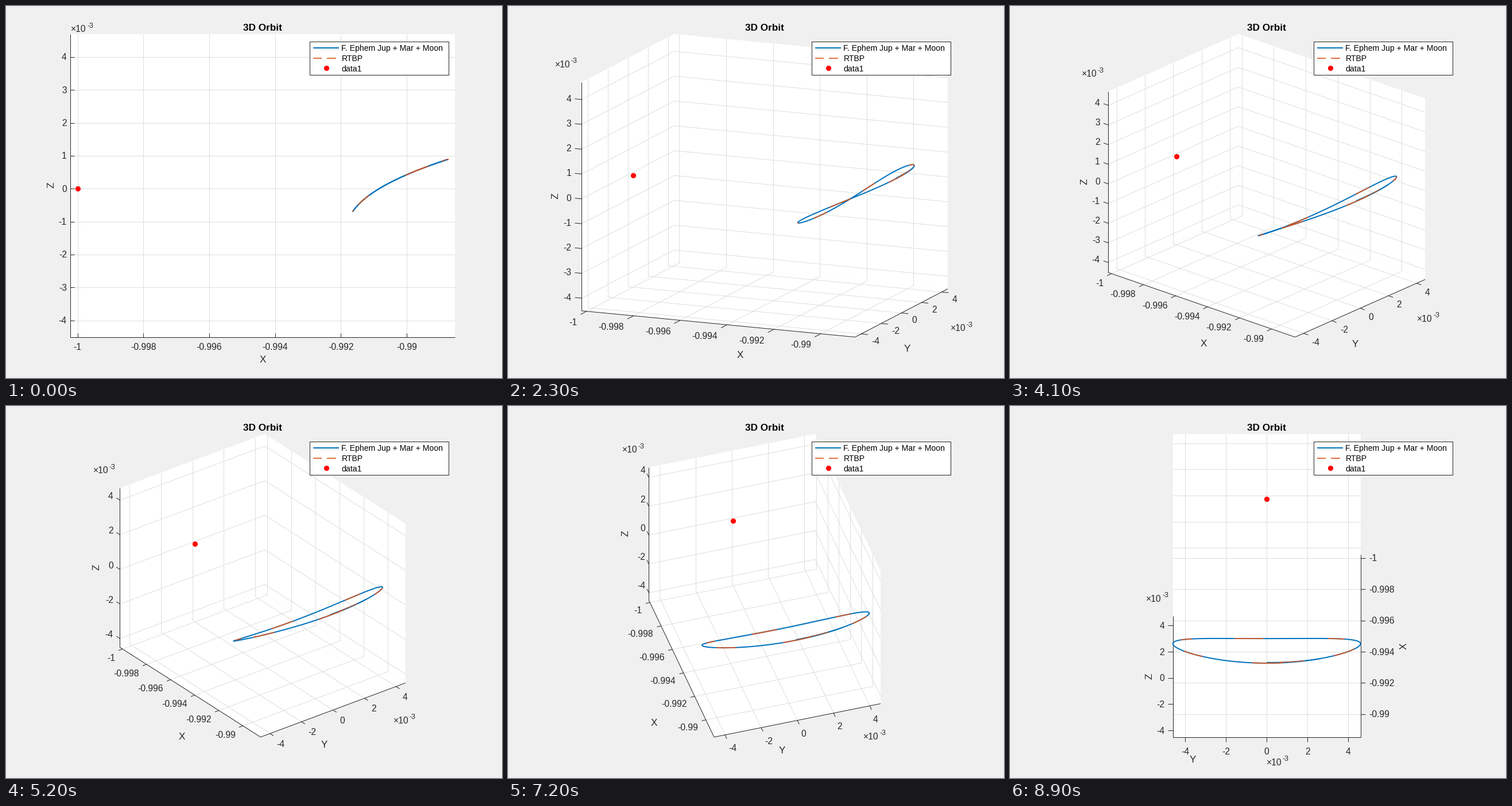
Recreate the animation shown at these times as a matplotlib script. Size 864x648 px, loop 9 s.

```python
import matplotlib.pyplot as plt
import numpy as np
from matplotlib.animation import FuncAnimation
from matplotlib.collections import LineCollection
from matplotlib.patches import Polygon, Rectangle

plt.rcParams["font.family"] = "Liberation Sans"

W, H, FRAMES = 864, 648, 90
PT = 0.72                                   # points per pixel at 100 dpi
LEFT, TOP, BOX_W, BOX_H = 112.32, 48.6, 669.6, 528.12
MID = np.array([LEFT + BOX_W / 2, TOP + BOX_H / 2])

# Data in units of 1e-3; x is measured from -1.
CENTER = np.array([5.625, 0.0, 0.0966])
HALF = np.array([5.838, 4.602, 4.6045])
(X0, Y0, Z0), (X1, Y1, Z1) = CENTER - HALF, CENTER + HALF

INK, GRID = (0.15, 0.15, 0.15), (0.87, 0.87, 0.87)
BLUE, ORANGE = "#0072BD", "#D95319"
TICK, LABEL, LEGEND = 15.6, 17.1, 14.0
GAP = 6.5
DOWN = np.array([0.0, 1.0])

# Offsets of the axis names and the y exponent along the turn
KEYS = [1, 12, 23, 41, 63, 72, 88]
X_NAME = ([72, 59, 38, 4, -33, -48, -90], [45, 47, 53, 66, 86, 94, 104])
Y_NAME = ([44, 27, 10, -9, -22.5, -26.5, -34], [44, 56.5, 61, 61.5, 56.5, 51.5, 42])
Y_EXP = ([62, 45, 26, 7, -7, -9, -12], [42, 62, 67, 67, 61, 56, 40])

ORANGE_ARCS = [(-9, 10), (46, 69), (124, 139), (182, 200), (233, 246), (298, 317)]

fig = plt.figure(figsize=(W / 100, H / 100), dpi=100, facecolor="#F0F0F0")
ax = fig.add_axes([0, 0, 1, 1])


class View:
    """Orthographic camera fitted to the plot box."""

    def __init__(self, az, el):
        ca, sa, ce, se = np.cos(az), np.sin(az), np.cos(el), np.sin(el)
        right = np.array([ca, sa, 0])
        down = np.array([sa * se, -ca * se, -ce])
        self.axes = np.stack([right, down], axis=1)
        w, h = 2 * HALF @ np.abs(self.axes)
        self.scale = min(BOX_W / w, BOX_H / h)
        self.top = MID[1] - h * self.scale / 2
        self.lengths = 2 * HALF * np.linalg.norm(self.axes, axis=1) * self.scale

    def __call__(self, *p):
        p = np.stack(np.broadcast_arrays(*p), axis=-1)
        return MID + self.scale * (p - CENTER) @ self.axes

    def toward(self, axis, sign):
        d = sign * self.axes[axis]
        return d / np.linalg.norm(d)


def orbit(deg, shrink=0):
    t = np.radians(deg)
    u = 9.59 + 1.4515 * np.cos(t) + 0.222 * np.cos(2 * t) - shrink
    z = 0.109 + 0.7935 * np.cos(t) - 0.009 * np.cos(2 * t)
    return u, 4.6 * np.sin(t), z


def write(x, y, s, size, ha="center", color=INK, **kw):
    """Put text with its capitals centred on height y."""
    ax.text(x, y + 0.355 * size, s, fontsize=size * PT, ha=ha, va="baseline",
            color=color, **kw)


def write_up(x, y, s, size):
    ax.text(x + 0.355 * size, y, s, fontsize=size * PT, rotation=90, color=INK,
            rotation_mode="anchor", ha="center", va="baseline")


def exponent(x, y):
    write(x - 21, y + 0.7, "\u00d710", TICK, "left")
    write(x + 7, y - 5.5, "-3", 12.5, "left")


def stroke(p, color, width):
    ax.plot(p[:, 0], p[:, 1], color=color, lw=width * PT, solid_capstyle="butt")


def segments(segs, color, width=1.0):
    ax.add_collection(LineCollection(segs, colors=[color], linewidths=width * PT))


def ruler(ends, points, labels, d, size, ha, valign, nudge=0):
    """Axis line with ticks along d; a negative size draws them inward."""
    segs = [ends] + [np.array([p, p + size * d]) for p in points]
    segments(segs, INK)
    for p, s in zip(points, labels):
        q = p + (max(size, 0) + GAP) * d
        write(q[0] + nudge, q[1] + (10.3 if valign == "top" else 0), s, TICK, ha)


def offset(table, k):
    return np.array([np.interp(k, KEYS, row) for row in table])


def panes(v, last, ticks):
    xs, ys, zs = ticks
    faces = [v([X0, X1, X1, X0], [Y0, Y0, Y1, Y1], Z0),
             v([X0, X1, X1, X0], Y1, [Z0, Z0, Z1, Z1]),
             v(X0, [Y0, Y1, Y1, Y0], [Z0, Z0, Z1, Z1])]
    for f in faces:
        ax.add_patch(Polygon(f, fc="white", ec="none"))
    segs = [v(x, [Y0, Y1], Z0) for x in xs]
    segs += [v([X0, X1], y, Z0) for y in ys]
    segs += [v(X0, y, [Z0, Z1]) for y in ys]
    segs += [v(X0, [Y0, Y1], z) for z in zs]
    if not last:
        segs += [v(x, Y1, [Z0, Z1]) for x in xs]
        segs += [v([X0, X1], Y1, z) for z in zs]
    segments(segs, GRID)


def rulers(v, k, el, ticks):
    xs, ys, zs = ticks
    first, last = k == 0, k == FRAMES - 1
    size = -0.01 * BOX_W if first else 0.025 * v.lengths.max()
    x_text = [f"{-1 + x / 1000:g}" for x in xs]
    y_text, z_text = ([f"{t:g}" for t in ts] for ts in (ys, zs))

    zx = X1 if last else X0
    z_dir = v.toward(1, -1) if last else v.toward(0, -1)
    z_line = v(zx, Y0, [Z0, Z1])
    ruler(z_line, v(zx, Y0, zs), z_text, z_dir, size, "right", "middle")
    z_mid, z_top = z_line.mean(0), z_line[1]
    write_up(z_mid[0] - 34.5 - max(size, 0), z_mid[1] - 0.5, "Z", LABEL)
    exponent(*(z_top + ((22, -9.5) if first else (-25.5, -32))))

    flat = el < np.radians(9.5)
    xy = Y1 if last else Y0
    x_line, x_pts = v([X0, X1], xy, Z0), v(xs, xy, Z0)
    x_mid = x_line.mean(0)
    if last:
        ruler(x_line, x_pts, x_text, v.toward(1, 1), size, "left", "middle")
        write_up(x_mid[0] + 74, x_mid[1], "X", LABEL)
    else:
        d = DOWN if flat else v.toward(1, -1)
        ruler(x_line, x_pts, x_text, d, size, "center" if flat else "right", "top")
        write(*(x_mid + ((0, 38) if first else offset(X_NAME, k))), "X", LABEL)
    if first:
        return

    y_line, y_pts = v(X1, [Y0, Y1], Z0), v(X1, ys, Z0)
    d = DOWN if flat else v.toward(0, 1)
    ruler(y_line, y_pts, y_text, d, size, "center" if last else "left", "top",
          -2.5 if flat else 0)
    if last:
        write(*(y_line.mean(0) + (-129, 38)), "Y", LABEL)
        exponent(467.5, 619.5)
    else:
        write(*(y_line.mean(0) + offset(Y_NAME, k)), "Y", LABEL)
        exponent(*(y_line[1] + offset(Y_EXP, k)))


def curves(v):
    t = np.linspace(0, 360, 361)
    stroke(v(*orbit(t)), BLUE, 2.0)
    t = np.linspace(0, 35, 40)
    stroke(v(*orbit(t, 0.045 * (1 - t / 35))), BLUE, 1.8)
    for a, b in ORANGE_ARCS:
        stroke(v(*orbit(np.linspace(a, b, 30))), ORANGE, 1.7)
    t = np.linspace(8, 24, 20)
    stroke(v(*orbit(t, 0.045 * (1 - t / 35))), ORANGE, 1.3)
    dot(*v(0, 0, 0))


def dot(x, y):
    ax.plot([x], [y], "o", color="red", ms=9.2 * PT, mew=0)


def legend():
    ax.add_patch(Rectangle((528.5, 61.5), 242, 58.5, fc="white", ec=INK,
                           lw=PT, zorder=3))
    old = len(ax.lines)
    stroke(np.array([[534.5, 73], [580, 73]]), BLUE, 2.0)
    for a, b in ((534.5, 549.5), (558.5, 574.5)):
        stroke(np.array([[a, 91], [b, 91]]), ORANGE, 1.6)
    dot(557.5, 108)
    for line in ax.lines[old:]:
        line.set_zorder(4)
    for y, s in ((73, "F. Ephem Jup + Mar + Moon"), (91, "RTBP"), (109, "data1")):
        write(584.5, y, s, LEGEND, "left", "black", zorder=4)


def draw(k):
    ax.clear()
    ax.set(xlim=(0, W), ylim=(H, 0))
    ax.axis("off")
    f = k / (FRAMES - 1)
    el = np.radians(50 * f)
    v = View(np.radians(90 * f), el)
    step = 1 if v.scale * np.cos(el) > 30.5 else 2
    ticks = np.arange(0, 11, 2), np.arange(-4, 5, 2), np.arange(-4, 5, step)
    panes(v, k == FRAMES - 1, ticks)
    rulers(v, k, el, ticks)
    curves(v)
    write(447, v.top - 12, "3D Orbit", LABEL, color="black", weight="bold")
    legend()
    return []


anim = FuncAnimation(fig, draw, frames=FRAMES, interval=100, init_func=lambda: [],
                     repeat=True, repeat_delay=0, blit=False)
plt.show()
```
